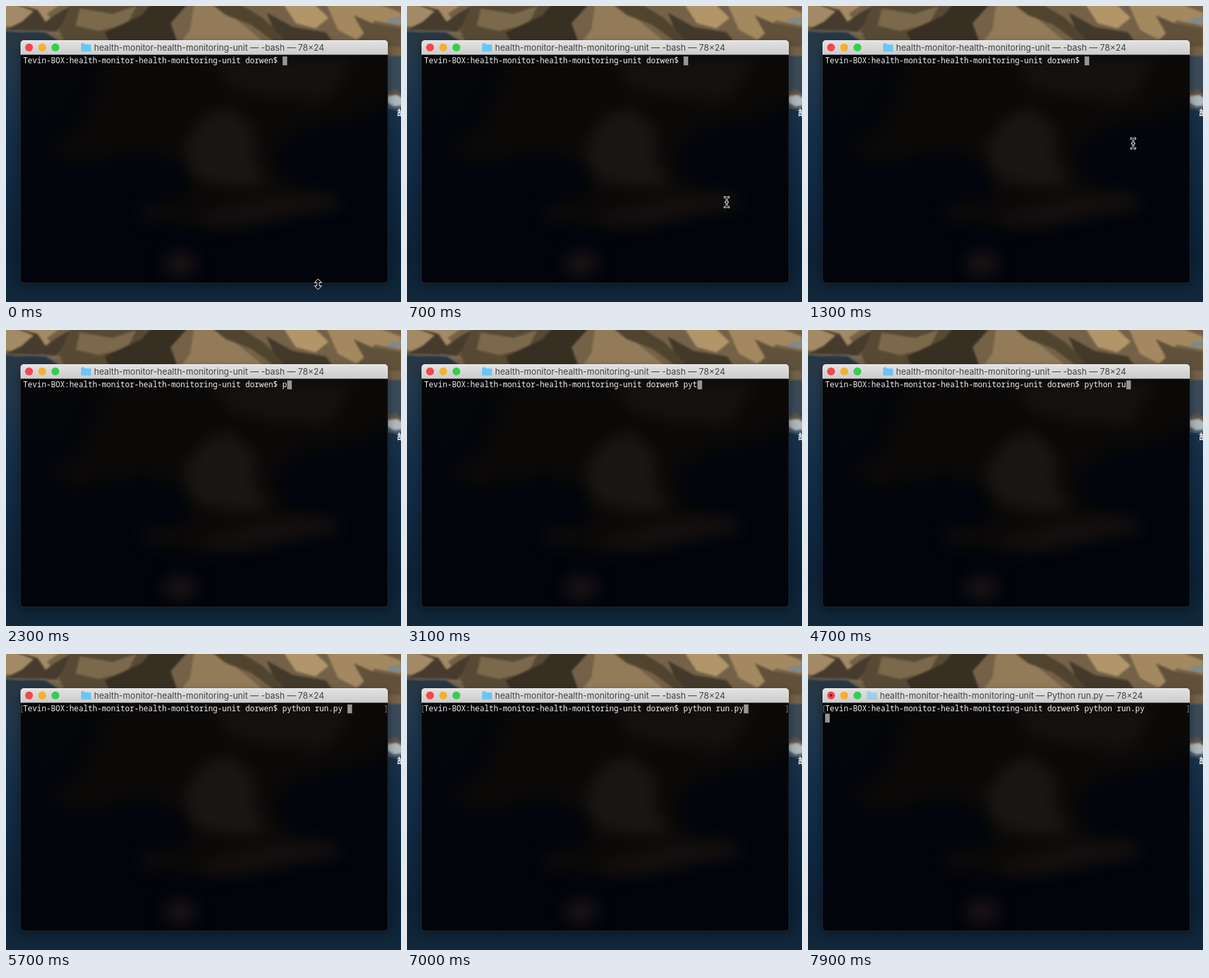
Animation of 600 by 450 pixels, one loop 8 s. Source, as an HTML page:

```html
<!DOCTYPE html>
<html lang="en">
<head>
<meta charset="utf-8">
<title>Terminal session</title>
<style>
  html, body { margin: 0; width: 100%; height: 100%; overflow: hidden; background: #10273f; }
  svg { display: block; width: 600px; height: 450px; }
  filter { color-interpolation-filters: sRGB; }
  text { white-space: pre; }
  .title { font: 12.95px Inter, sans-serif; fill: #424242; }
  .mono { font: 500 11.73px "Noto Sans Mono", monospace; fill: #f0f0f0; }
  .mark { font-weight: 400; fill: #777; }
  .label { font: 700 12px "Noto Sans CJK SC", "Noto Sans CJK", sans-serif; fill: #fff; }
  .pointer { fill: #0b0d10; stroke: #eee; stroke-linejoin: round; }
</style>
</head>
<body>
<svg viewBox="0 0 600 450">
  <defs>
    <linearGradient id="sea" x2="0" y2="1">
      <stop offset=".08" stop-color="#2a3742"/>
      <stop offset=".2" stop-color="#22384c"/>
      <stop offset=".45" stop-color="#142d47"/>
      <stop offset=".85" stop-color="#0c2136"/>
      <stop offset="1" stop-color="#12283a"/>
    </linearGradient>
    <linearGradient id="bar" x2="0" y2="1">
      <stop stop-color="#e4e3e4"/>
      <stop offset="1" stop-color="#cdcccd"/>
    </linearGradient>
    <linearGradient id="glass" x2="0" y2="1">
      <stop stop-color="#050607"/>
      <stop offset=".4" stop-color="#02050c"/>
      <stop offset="1" stop-color="#01040a"/>
    </linearGradient>
    <filter id="soft"><feGaussianBlur stdDeviation="1.5"/></filter>
    <filter id="haze" x="-30%" y="-30%" width="160%" height="160%"><feGaussianBlur stdDeviation="11"/></filter>
    <filter id="shade" x="-10%" y="-10%" width="120%" height="125%"><feGaussianBlur stdDeviation="7"/></filter>
    <clipPath id="pane"><path d="M22 74H580V416a5 5 0 0 1-5 5H27a5 5 0 0 1-5-5Z"/></clipPath>
  </defs>

  <!-- coast -->
  <rect width="600" height="450" fill="url(#sea)"/>
  <g filter="url(#soft)">
    <path fill="#746147" d="M-5-5H605V76L578 78V60H90L60 40 20 38-5 36Z"/>
    <path fill="#a38a66" d="M-5-5H86L62 12 74 26 40 36-5 30Z"/>
    <path fill="#463b2c" d="M8-5 42 8 24 24 0 36 76 39 94 20 108-5 80 10 60 24 48 6Z"/>
    <path fill="#574a35" d="M100-5H214L238 20 232 60H92L80 38Z"/>
    <path fill="#7c694b" d="M112 4 162 12 198 0 184 28 140 38 106 30Z"/>
    <path fill="#382f23" d="M150 40 206 14 222-5H278L250 26 262 60H160Z"/>
    <path fill="#937b59" d="M286-5H322L352 22 398 60H262L280 36Z"/>
    <path fill="#51442f" d="M310-5 334 14 372 28 410 56 430 56 390 18 352-5Z"/>
    <path fill="#b2966a" d="M420-5H466L490 18 470 34 440 26Z"/>
    <path fill="#43392a" d="M396 10 436 32 486 40 500 60H430L406 34Z"/>
    <path fill="#a48860" d="M486-5H560L600 10V30L560 22 534 52 504 36Z"/>
    <path fill="#61513b" d="M528 14 556 26 600 34V62H520L544 42Z"/>
    <path fill="#7f888b" d="M578 20 605 16V26L582 27Z"/>
    <path fill="#3a4a59" d="M578 76H605V128H578Z"/>
    <path fill="#5d5349" d="M578 130 592 126 605 134V142H578Z"/>
    <path fill="#aeb7bb" d="M578 137 594 135 605 142V151L589 153 578 146Z"/>
    <path fill="#4c5a68" d="M578 147 591 153 605 151V160L578 155Z"/>
    <path fill="none" stroke="#7d827f" stroke-width="1.2" d="M-5 37 20 39 55 38 84 43"/>
  </g>
  <text class="label" x="594" y="167">故</text>

  <!-- window -->
  <rect x="22" y="58" width="558" height="367" rx="6" fill="#000" opacity=".4" filter="url(#shade)"/>
  <g clip-path="url(#pane)">
    <rect x="22" y="74" width="558" height="347" fill="url(#glass)"/>
    <g filter="url(#haze)">
      <path fill="#0b0908" d="M160 60H600V140L520 172 450 185 405 225 425 270 500 288 500 308 400 322 320 340 210 325 200 305 280 290 270 240 210 222 100 240 60 215 115 180Z"/>
      <path fill="#1a1613" d="M300 170 340 155 378 190 375 235 400 270 345 275 285 260 270 215Z"/>
      <path fill="#14110f" d="M310 80H530L490 145 410 140 340 125Z"/>
      <path fill="#15100f" d="M405 290 495 285 510 305 440 318 360 336 280 332 320 312Z"/>
      <ellipse cx="264" cy="392" rx="26" ry="20" fill="#181214"/>
      <ellipse cx="228" cy="314" rx="22" ry="16" fill="#0e0b0c"/>
    </g>
  </g>
  <path fill="url(#bar)" d="M22 74V57a5 5 0 0 1 5-5H575a5 5 0 0 1 5 5V74Z"/>
  <path fill="none" stroke="#efefef" d="M26 52.5H576"/>
  <path fill="none" stroke="#8a8a8a" stroke-width=".6" d="M22 74H580"/>
  <path fill="none" stroke="#515a64" stroke-width=".7" opacity=".5" d="M22 74V416a5 5 0 0 0 5 5H575a5 5 0 0 0 5-5V74"/>
  <circle cx="35" cy="63" r="6" fill="#f2474f"/>
  <circle cx="55" cy="63" r="6" fill="#f2b12f"/>
  <circle cx="75" cy="63" r="6" fill="#33cf4b"/>
  <circle id="busy" cx="35" cy="63" r="2" fill="#6c1015"/>
  <g id="heading">
    <path id="folder" fill="#69c6f4" d="M0 58q0-1.2 1.2-1.2H5l1.6 1.6H14q1.2 0 1.2 1.2V68q0 1.2-1.2 1.2H1.2Q0 69.2 0 68Z"/>
    <text id="title" class="title" x="19.8" y="67.6"></text>
  </g>

  <!-- shell -->
  <g id="marks">
    <text class="mono mark" x="20.5" y="87">[</text>
    <text class="mono mark" x="574" y="87">]</text>
  </g>
  <rect id="caret" width="7" height="13.5" fill="#959595"/>
  <text id="line" class="mono" x="26" y="87.2"></text>

  <g id="pointer" class="pointer">
    <path id="resize" d="M0-8 5.5-2.5H1.8V2.5H5.5L0 8-5.5 2.5H-1.8V-2.5H-5.5Z"/>
    <path id="beam" d="M-4-8.5H-1.5L0-7.5 1.5-8.5H4V-6.5H2L1-5.5V-1H2.5V1H1V5.5L2 6.5H4V8.5H1.5L0 7.5-1.5 8.5H-4V6.5H-2L-1 5.5V1H-2.5V-1H-1V-5.5L-2-6.5H-4Z"/>
  </g>
</svg>
<script>
const LOOP = 8000, STEP = 100, CHAR = 7.038;
const PROMPT = 'Tevin-BOX:health-monitor-health-monitoring-unit dorwen$ ';
const COMMAND = 'python run.py ';
const KEYS = [2100, 2500, 2900, 3200, 3600, 3900, 4100, 4400, 4600, 4800, 5000, 5200, 5400, 5500];
const COMPLETE = 5500, ERASE = 6500, ENTER = 7600;
const $ = id => document.getElementById(id);
const show = (id, on) => $(id).setAttribute('visibility', on ? 'visible' : 'hidden');
const move = (id, x, y) => $(id).setAttribute('transform', `translate(${x} ${y})`);

function draw(t) {
  const running = t >= ENTER;
  const typed = t >= ERASE ? COMMAND.length - 1 : KEYS.filter(k => k <= t).length;
  $('line').textContent = PROMPT + COMMAND.slice(0, typed);
  move('caret', running ? 26 : 26 + (PROMPT.length + typed) * CHAR, running ? 90.7 : 76.7);
  show('marks', t >= COMPLETE);

  $('title').textContent = `health-monitor-health-monitoring-unit — ${running ? 'Python run.py' : '-bash'} — 78×24`;
  move('heading', running ? 89.5 : 114, 0);
  $('folder').setAttribute('opacity', running ? .55 : 1);
  show('busy', running);

  const p = Math.min(1, Math.max(0, (t - 200) / 900));
  const ease = p * p * (3 - 2 * p);
  const y = 423 - 214 * ease;
  const visible = t < KEYS[0];
  move('pointer', 474 + 20 * ease, y);
  show('resize', visible && y > 416);
  show('beam', visible && y <= 416);
}

const start = performance.now();
function tick() {
  const t = (performance.now() - start) % LOOP;
  draw(Math.floor(t / STEP) * STEP);
  requestAnimationFrame(tick);
}
tick();
</script>
</body>
</html>
```
